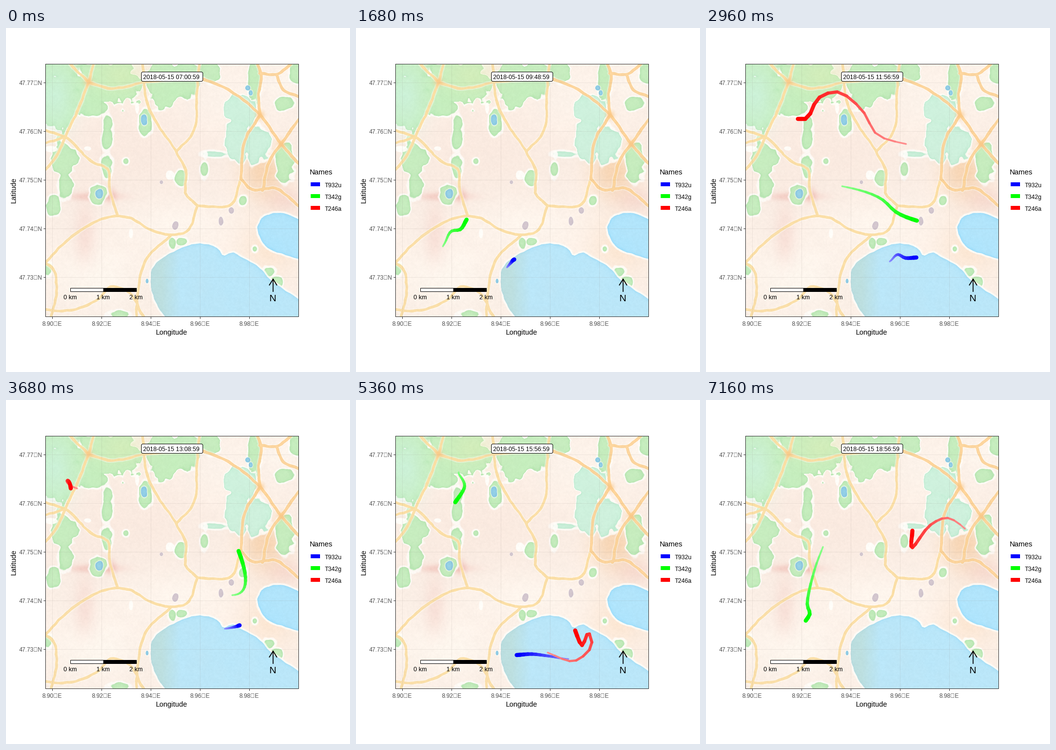
Recreate the animation shown at these times as a matplotlib script. Size 700 by 700 pixels, loop 7.2 s.

```python
import numpy as np
import matplotlib.pyplot as plt
from matplotlib.animation import FuncAnimation
from matplotlib.collections import LineCollection
from matplotlib.patches import FancyBboxPatch, Rectangle
from matplotlib.path import Path

FRAMES, INTERVAL, TAIL = 180, 40, 14
LEFT, TOP, W, H = 80, 73, 516, 515
PT = 0.72  # points per pixel at 100 dpi

plt.rcParams["font.family"] = "Liberation Sans"
rng = np.random.default_rng(15)
X, Y = np.meshgrid(np.arange(W) + LEFT + 0.5, np.arange(H) + TOP + 0.5)


def spline(t, knots, p):
    """Cubic Hermite curve through the rows of p."""
    m = np.gradient(p, knots, axis=0)
    k = np.clip(np.searchsorted(knots, t, side="right") - 1, 0, len(knots) - 2)
    h = np.diff(knots)[k][:, None]
    u = (t[:, None] - knots[k][:, None]) / h
    return ((1 + 2 * u) * (1 - u) ** 2 * p[k] + u * (1 - u) ** 2 * h * m[k]
            + u ** 2 * (3 - 2 * u) * p[k + 1] + u ** 2 * (u - 1) * h * m[k + 1])


# ---- watercolour base map ----
def noise(n):
    """Smooth noise on an n by n lattice."""
    def tent(size):
        pos = np.linspace(0, n - 1, size)[:, None]
        return np.maximum(0, 1 - abs(pos - np.arange(n)))
    return tent(H) @ rng.uniform(-1, 1, (n, n)) @ tent(W).T


stain = 0.5 * noise(9) + 0.3 * noise(22) + 0.2 * noise(60)
ragged = 0.3 * noise(28) + 0.2 * noise(60)
WX, WY = X + noise(60), Y + noise(60)
img = np.ones((H, W, 3)) * (252, 240, 231)


def blend(weight, color):
    global img
    img = img + weight[..., None] * (np.array(color) - img)


def spot(x, y, rx, ry, color, a):
    soft = np.exp(-((X - x) / rx) ** 2 - ((Y - y) / ry) ** 2)
    blend(a * soft * (1 + 0.3 * stain), color)


def patches(ellipses):
    """Rough distance to a union of ragged ellipses, negative inside."""
    return np.min([(np.hypot((X - x) / rx, (Y - y) / ry) - 1 + ragged) * min(rx, ry)
                   for x, y, rx, ry in ellipses], axis=0)


def outline(*points):
    p = np.array(points, float)
    s = np.r_[0, np.cumsum(np.hypot(*np.diff(p, axis=0).T))]
    return spline(np.linspace(0, s[-1], 6 * len(p)), s, p)


def distance(lines):
    d = np.full((H, W), 99.0)
    for p in lines:
        for a, b in zip(p, p[1:]):
            lo = np.maximum(np.minimum(a, b) - (LEFT + 14, TOP + 14), 0).astype(int)
            hi = np.maximum(np.maximum(a, b) - (LEFT - 14, TOP - 14), 0).astype(int)
            s = slice(lo[1], hi[1]), slice(lo[0], hi[0])
            dx, dy, u = WX[s] - a[0], WY[s] - a[1], b - a
            t = np.clip((dx * u[0] + dy * u[1]) / (u @ u + 1e-9), 0, 1)
            d[s] = np.minimum(d[s], np.hypot(dx - t * u[0], dy - t * u[1]))
    return d


def shore(*points):
    p = outline(*points)
    d = distance([p])
    inside = Path(p).contains_points(np.c_[WX.ravel(), WY.ravel()]).reshape(H, W)
    return np.where(inside, -d, d)


def wash(d, color, edge, halo=4.5):
    blend(0.85 * np.clip((halo - d) / 2, 0, 1), (255, 253, 249))
    fill = np.clip(0.5 - d, 0, 1)
    blend(fill * (0.92 + 0.08 * stain), color)
    blend(fill * 0.4 * np.exp(-abs(d) / 3), edge)
    return fill


def roads(lines, color, edge, width):
    d = distance(lines) - width / 2
    blend(0.55 * np.clip((3 - d) / 2.5, 0, 1), (255, 250, 240))
    fill = np.clip(0.5 - d, 0, 1)
    blend(fill * (0.88 + 0.12 * stain), color)
    blend(fill * 0.35 * np.exp(-abs(d) / 1.2), edge)


ROSE, ORANGE, CREAM = (231, 140, 132), (246, 201, 155), (255, 249, 241)
spot(250, 250, 190, 110, (248, 226, 214), 0.4)
spot(525, 295, 45, 50, ORANGE, 0.7)
spot(540, 440, 60, 60, ORANGE, 0.25)
spot(570, 350, 40, 25, ROSE, 0.18)
spot(180, 343, 50, 8, ROSE, 0.4)
spot(212, 340, 12, 14, ROSE, 0.35)
spot(160, 430, 20, 70, ROSE, 0.18)
spot(180, 510, 90, 55, CREAM, 0.8)
spot(430, 140, 70, 60, CREAM, 0.4)
spot(560, 110, 40, 35, CREAM, 0.6)
spot(340, 400, 120, 50, CREAM, 0.5)

west = [(100, 140, 55, 66), (112, 85, 50, 22), (120, 268, 25, 34), (120, 322, 14, 30),
        (98, 362, 14, 20), (205, 280, 11, 22)]
north = [(205, 112, 70, 52), (180, 160, 32, 22), (206, 212, 10, 36), (322, 112, 38, 50),
         (362, 102, 34, 38), (415, 90, 22, 24), (283, 194, 13, 26)]
east = [(567, 152, 18, 14), (588, 90, 13, 20), (568, 278, 17, 38), (506, 110, 13, 44),
        (355, 306, 11, 17), (403, 288, 7, 14), (535, 495, 13, 9), (552, 518, 11, 13)]
groves = [(187, 338, 17, 17), (482, 351, 7, 9), (338, 437, 7, 11), (357, 435, 9, 7),
          (230, 584, 20, 9), (86, 490, 7, 11), (506, 450, 4, 5), (244, 271, 5, 5)]
mint = [(474, 170, 32, 30), (470, 222, 25, 46), (512, 232, 24, 40), (425, 257, 24, 6)]

wash(patches(west + north + east + groves), (194, 236, 186), (150, 214, 150))
wash(patches(mint), (203, 240, 219), (160, 224, 186))
spot(100, 140, 40, 70, (206, 242, 226), 0.6)
spot(235, 95, 50, 35, (222, 238, 182), 0.5)
specks = [(335, 299, 9, 8), (254, 420, 5, 11), (165, 245, 7, 4), (406, 260, 5, 9),
          (92, 246, 12, 6), (267, 165, 4, 11)]
blend(0.9 * np.clip(0.5 - patches(specks), 0, 1), (255, 254, 250))
blocks = [(345, 402, 7, 9), (437, 392, 5, 9), (459, 372, 6, 8), (316, 314, 3, 3)]
wash(patches(blocks), (211, 198, 205), (190, 178, 192), halo=1.5)

lake = shore((610, 560), (560, 529), (536, 511), (520, 491), (482, 468), (460, 457), (441, 464),
             (434, 452), (396, 439), (350, 451), (298, 490), (296, 530), (314, 574), (350, 610),
             (610, 610), (610, 560))
cove = shore((610, 396), (557, 376), (522, 386), (512, 404), (525, 440), (574, 463), (610, 472),
             (610, 396))
basin = wash(lake, (181, 229, 249), (126, 205, 240))
blend(basin * 0.75 * np.clip((355 - X) / 38, 0, 1), (190, 221, 216))
wash(cove, (171, 227, 252), (118, 205, 246))
ponds = [(281, 188, 7, 10), (189, 337, 8, 9), (492, 122, 5, 5), (498, 132, 4, 5), (287, 515, 3, 5)]
wash(patches(ponds), (145, 207, 231), (104, 178, 214), halo=2)

west_hub, junction, mid = (168, 110), (227, 383), (390, 361)
town, corner, cross = (517, 177), (560, 236), (478, 308)
roads([
    outline((130, 73), west_hub), outline((178, 73), west_hub),
    outline(west_hub, (145, 170), (120, 222), (105, 257), (80, 288)),
    outline(west_hub, (205, 122), (290, 109), (402, 104)),
    outline((80, 208), (120, 222), (180, 275), (208, 287), (210, 320), junction),
    outline((80, 234), (120, 222)),
    outline((80, 478), (114, 442), (140, 420), junction, (252, 386), (290, 408), (337, 421),
            (366, 415), mid),
    outline((337, 421), (286, 470), (267, 550), (266, 588)),
    outline((80, 478), (94, 488), (103, 530), (92, 588)),
    outline((80, 573), (110, 576), (186, 553), (216, 526), (246, 535), (280, 588)),
    outline((278, 73), (288, 155), (346, 252), (366, 290), (368, 342), mid),
    outline((346, 252), (382, 210), (388, 140), (393, 73)),
    outline(mid, (420, 364), (456, 360), cross),
], (251, 222, 163), (247, 205, 130), 5)
roads([
    outline((402, 104), (440, 119), town, corner, (596, 276)),
    outline(cross, (480, 270), (486, 230), town),
    outline(cross, (500, 328), (546, 326), (596, 362)),
    outline((522, 331), (540, 262), corner, (576, 213), (596, 186)),
    outline(town, (514, 132), (520, 98), (512, 73)),
    outline((517, 92), (550, 94), (580, 73)), outline((550, 94), (566, 127), (596, 140)),
], (253, 211, 150), (247, 184, 110), 5.5)
for x, y in (town, corner, west_hub):
    spot(x, y, 8, 8, (249, 195, 127), 0.7)

img += 2.5 * noise(170)[..., None] + rng.normal(0, 1.2, (H, W, 1)) + 3 * stain[..., None]
img = np.clip(img, 0, 255).astype(np.uint8)


# ---- figure ----
fig = plt.figure(figsize=(7, 7), dpi=100, facecolor="white")
ax = fig.add_axes([0, 0, 1, 1])
ax.imshow(img, extent=(LEFT, LEFT + W, TOP + H, TOP), interpolation="nearest")
ax.set(xlim=(0, 700), ylim=(700, 0))
ax.axis("off")


def text(x, y, s, px=12.2, color="black", ha="left", **kw):
    return ax.text(x, y, s, fontsize=px * PT, color=color, ha=ha, va="baseline", **kw)


def line(xs, ys, color="black", px=1.0, **kw):
    ax.plot(xs, ys, color=color, lw=px * PT, snap=False, **kw)


def box(x, y, w, h, face, edge="none", z=2):
    ax.add_patch(Rectangle((x, y), w, h, fc=face, ec=edge, lw=PT, zorder=z, snap=False))


for k in range(5):
    x, y = 94.5 + 100.25 * k, 111.5 + 99 * k
    for xs, ys in [((x, x), (TOP, 588)), ((LEFT, 596), (y, y))]:
        line(xs, ys, "#8a7f78", alpha=0.13, solid_capstyle="butt")
    line((x, x), (588, 592), "#333333", solid_capstyle="butt")
    line((76.5, 80), (y, y), "#333333", solid_capstyle="butt")
    text(x - 0.5, 606, f"{8.90 + 0.02 * k:.2f}\u25afE", 12, "#4d4d4d", "center")
    text(74, y + 4.5, f"{47.77 - 0.01 * k:.2f}\u25afN", 11.8, "#4d4d4d", "right")
box(80.5, 73.5, 515, 514, "none", "#333333", 6)
text(336.5, 624, "Longitude", 14.5, ha="center")
text(20, 330, "Latitude", 14.5, ha="center", rotation=90, rotation_mode="anchor")

text(618, 297.5, "Names", 14.7)
COLORS = [(0, 0, 1), (0, 1, 0), (1, 0, 0)]
for k, name in enumerate(["T932u", "T342g", "T246a"]):
    box(620, 314 + 24 * k, 19, 8, COLORS[k])
    text(649, 324 + 24 * k, name)

for k, face in enumerate(["white", "black"]):
    box(131.5 + 67 * k, 529.5, 67, 7, face, "black", 5)
for k in range(3):
    text(130.5 + 67 * k, 552, f"{k} km", 12.5, ha="center", zorder=5)
line((543.5, 543.5), (536, 511), px=1.8, zorder=5)
line((536, 543.5, 551), (523, 511, 523), px=1.8, zorder=5)
text(542.5, 555.5, "N", 19.5, ha="center", zorder=5)

ax.add_patch(FancyBboxPatch((278.5, 92.5), 119, 13, boxstyle="round,pad=3,rounding_size=3",
                            fc="white", ec="black", lw=PT, zorder=7))
clock = text(279, 104, "", 12.35, zorder=8)


# ---- tracks: key moments as (step, x, y) ----
blue = [(0, 307, 488), (30, 309, 485), (35, 315, 478), (42, 322, 471), (60, 374, 475),
        (66, 391, 461), (70, 406, 468), (74, 428, 467), (96, 478, 458), (102, 478, 459),
        (107, 477, 489), (110, 469, 502), (120, 432, 527), (126, 392, 521), (130, 358, 517),
        (134, 327, 519), (146, 303, 514), (155, 302, 514), (160, 295, 521), (168, 295, 521)]
lime = [(0, 180, 440), (30, 181, 437), (35, 195, 413), (38, 212, 410), (42, 225, 390),
        (60, 277, 322), (67, 360, 350), (70, 386, 374), (74, 429, 392), (96, 446, 246),
        (99, 416, 189), (102, 370, 173), (106, 309, 149), (110, 242, 151), (120, 209, 147),
        (129, 220, 180), (134, 202, 208), (146, 171, 248), (151, 172, 249), (156, 207, 279),
        (158, 236, 280), (160, 239, 298), (165, 238, 299), (169, 221, 345), (174, 206, 415),
        (177, 211, 436), (179, 203, 449)]
red = [(52, 545, 215), (60, 407, 236), (63, 344, 213), (65, 322, 173), (68, 267, 130),
       (70, 231, 141), (73, 202, 185), (74, 187, 185), (96, 130, 220), (98, 126, 250),
       (101, 164, 284), (104, 190, 355), (110, 288, 462), (120, 390, 514), (124, 448, 530),
       (127, 480, 493), (128, 475, 476), (131, 460, 499), (134, 446, 469), (146, 460, 437),
       (149, 446, 402), (154, 535, 374), (158, 553, 320), (160, 534, 298), (165, 527, 262),
       (168, 492, 240), (171, 457, 254), (175, 420, 300), (179, 420, 266)]


class Trail:
    def __init__(self, keys, color):
        keys = np.array(keys, float)
        self.start, self.end = int(keys[0, 0]), int(keys[-1, 0])
        steps = np.arange(self.start, self.end + 1.0)
        self.path = spline(steps, keys[:, 0], keys[:, 1:])
        self.color = np.array(color)
        self.lines = LineCollection([], capstyle="round", zorder=4)
        ax.add_collection(self.lines, autolim=False)

    def show(self, i):
        if not self.start < i <= self.end:
            self.lines.set_segments([])
            return
        p = self.path[max(0, i - self.start - TAIL):i - self.start + 1]
        age = np.arange(len(p) - 2, -1, -1) / (TAIL - 1)
        self.lines.set_segments(np.stack([p[:-1], p[1:]], 1))
        self.lines.set_color(self.color + 0.55 * age[:, None] * (1 - self.color))
        self.lines.set_linewidths((8.4 - 5 * age) * PT)


trails = [Trail(keys, color) for keys, color in zip((blue, lime, red), COLORS)]


def update(i):
    hour, minute = divmod(7 * 60 + 4 * i, 60)
    clock.set_text(f"2018-05-15 {hour:02d}:{minute:02d}:59")
    for trail in trails:
        trail.show(i)
    return [clock] + [trail.lines for trail in trails]


anim = FuncAnimation(fig, update, frames=FRAMES, interval=INTERVAL, repeat=True, repeat_delay=0)
plt.show()
```
